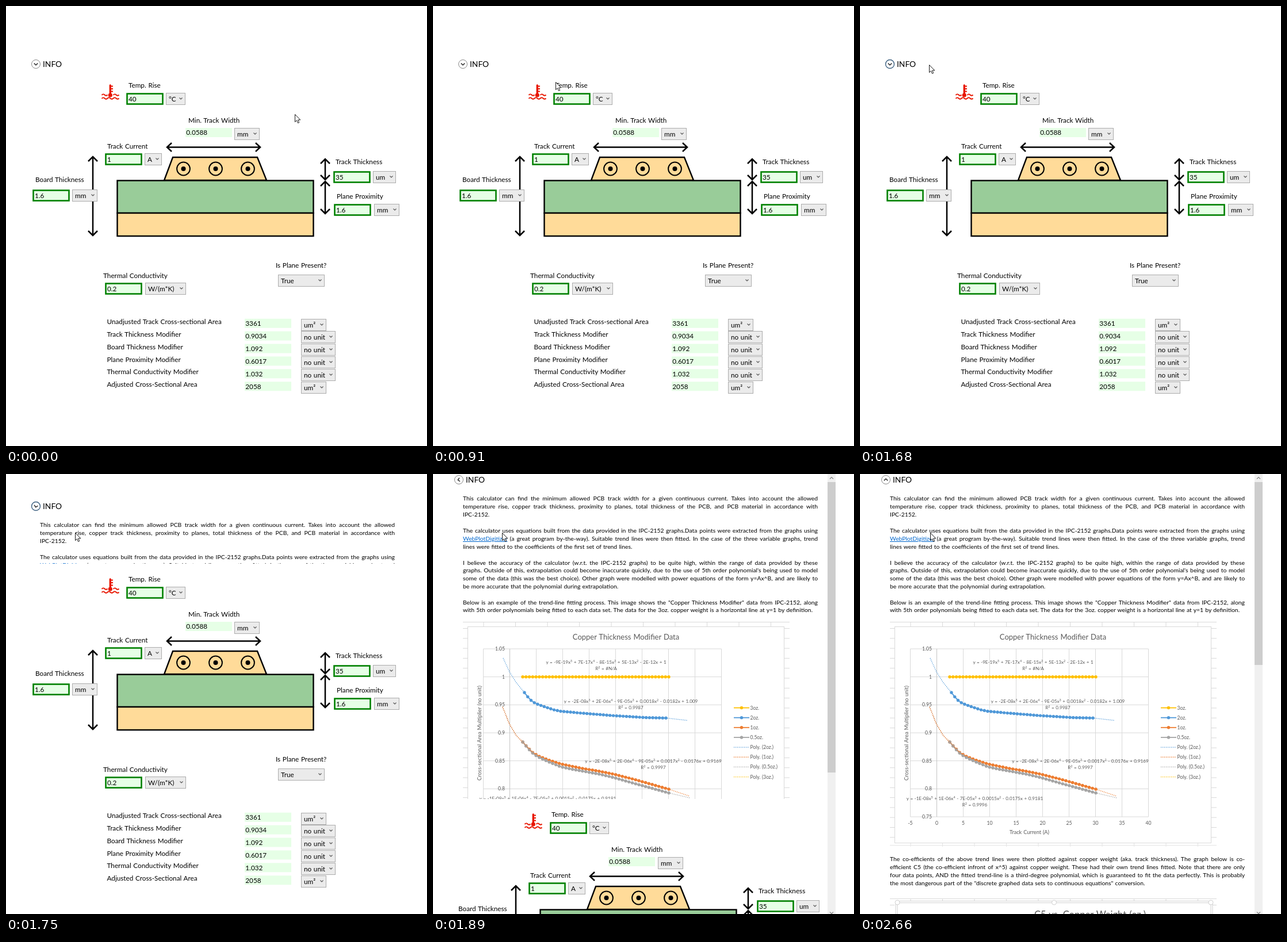
Write an HTML page that moves like this. It is 732x765 px and loops after 3640 ms.

```html
<!DOCTYPE html>
<html lang="en">
<head>
<meta charset="utf-8">
<title>Track width calculator</title>
<style>
  html, body { margin: 0; width: 100%; height: 100%; overflow: hidden; background: #fff; }
  body { position: relative; font: 11.75px Lato, sans-serif; color: #000; }
  div, svg { position: absolute; left: 0; top: 0; }
  svg { overflow: visible; }
  text { word-spacing: .055em; white-space: pre; }
  #info { top: 111px; width: 690px; overflow: hidden; }
  #doc { left: 7px; top: -20px; }
  .line { left: 52px; width: 617px; font-size: 10.35px; line-height: 14px; white-space: nowrap; }
  .full { text-align: justify; text-align-last: justify; }
  .last { word-spacing: .055em; }
  u { color: #06c; }
  #bar { left: 686px; width: 14px; height: 765px; background: #f0f0f0; }
  #thumb { top: 14px; width: 14px; background: #cdcdcd; }
</style>
</head>
<body>
<div id="page">
  <svg id="head" width="1" height="1">
    <circle id="ring" cx="52" cy="101" r="7.5" fill="#fff"/>
    <path id="chev" d="M48.8 99.6L52 102.7L55.2 99.6" fill="none" stroke="#333" stroke-width="1.6"/>
    <text x="64" y="106.3" font-size="13.8">INFO</text>
  </svg>
  <div id="info"><div id="doc"></div></div>
  <svg id="form" width="1" height="1"></svg>
</div>
<div id="bar">
  <div id="thumb"></div>
  <svg width="14" height="765" fill="none" stroke="#888" stroke-width="1.2">
    <path d="M4 8.5L7 5.5L10 8.5M4 761.5L7 764.5L10 761.5"/>
  </svg>
</div>
<svg id="mouse" width="1" height="1">
  <path d="M.5 .5V13.6L3.5 10.8L5.5 15.5L7.7 14.6L5.7 10H9.8Z" fill="#fff" stroke="#000" stroke-width=".9"/>
</svg>
<script>
const $ = id => document.getElementById(id);
const text = (x, y, s, extra = '') => `<text x="${x}" y="${y}" ${extra}>${s}</text>`;
const rect = (x, y, w, h, extra) => `<rect x="${x}" y="${y}" width="${w}" height="${h}" ${extra}/>`;
const path = (d, stroke, width, extra = '') =>
  `<path d="${d}" fill="none" stroke="${stroke}" stroke-width="${width}" ${extra}/>`;
const range = (n, f) => Array.from({ length: n }, (_, i) => f(i)).join('');

// ---- calculator form ----
const input = (x, y, s) =>
  rect(x + 1.5, y + 1.5, 62, 18, 'fill="#e6ffe6" stroke="#008000" stroke-width="2.6"') + text(x + 4, y + 14.5, s);
const result = (x, y, s) => rect(x, y, 81, 16, 'fill="#e6ffe6"') + text(x + 1.3, y + 12.3, s);
const combo = (x, y, w, s) => rect(x + .5, y + .5, w - 1, 20, 'fill="#ebebeb" stroke="#acacac"') +
  text(x + 5, y + 14.8, s) +
  path(`M${x + w - 10.5} ${y + 8.5}l2.5 2.5l2.5 -2.5`, '#555', 1.1);
const arrowV = (x, a, b) =>
  path(`M${x} ${a}V${b}M${x - 8} ${a + 8}L${x} ${a}l8 8M${x - 8} ${b - 8}L${x} ${b}l8 -8`, '#000', 2.5);

const labels = [
  [213, 142, 'Temp. Rise'], [317, 203, 'Min. Track Width'], [176, 247.5, 'Track Current'],
  [51, 306, 'Board Thickness'], [573, 274.5, 'Track Thickness'], [575, 335, 'Plane Proximity'],
  [469, 454.5, 'Is Plane Present?'], [169, 472.5, 'Thermal Conductivity']
];
const inputs = [[209, 151, 40], [172, 256, 1], [46, 319, 1.6], [569, 287, 35], [570, 344, 1.6], [172, 481, .2]];
const combos = [
  [278, 151, 34, '°C'], [397, 212, 44, 'mm'], [241, 256, 30, 'A'], [115, 319, 44, 'mm'],
  [638, 287, 40, 'um'], [640, 344, 44, 'mm'], [242, 481, 71, 'W/(m*K)'], [473, 467, 81, 'True']
];
const rows = [
  ['Unadjusted Track Cross-sectional Area', 3361], ['Track Thickness Modifier', .9034],
  ['Board Thickness Modifier', 1.092], ['Plane Proximity Modifier', .6017],
  ['Thermal Conductivity Modifier', 1.032], ['Adjusted Cross-Sectional Area', 2058]
];

const thermometer =
  path('M181.3 138V155M182 139.5h4M182 144h4M182 148.5h4', '#e81800', 2) +
  path('M181.3 138V154', '#e81800', 3.4, 'stroke-linecap="round"') +
  '<circle cx="181.3" cy="155" r="3.6" fill="#e81800"/>' +
  path('M166.5 155q2.5 -3 5 -.5t5 0M186.5 155q2.5 -3 5 -.5t5 0' +
       'M166.5 161q2.5 -3 5 -.5t5 0t5 0t5 0t5 0t5 0', '#e81800', 1.9);

const ink = 'stroke="#000" stroke-width="2.4"';
const board =
  `<path d="M290 263H437L453 303H275Z" fill="#ffdb99" ${ink}/>` +
  rect(193.5, 303.5, 341, 56.5, `fill="#9c9" ${ink}`) +
  rect(193.5, 360, 341, 40, `fill="#ffdb99" ${ink}`) +
  range(3, i => `<circle cx="${308.5 + 56 * i}" cy="283" r="11.4" fill="none" stroke="#000" stroke-width="2"/>` +
    `<circle cx="${308.5 + 56 * i}" cy="283" r="4"/>`) +
  path('M280 245.5H442M288 238L280 245.5l8 7.5M434 238L442 245.5l-8 7.5', '#000', 2.5) +
  arrowV(151, 262, 399) + arrowV(555, 266, 302) + arrowV(555, 305, 361);

const table = rows.map(([name, value], i) =>
  text(175.5, 552.8 + 21.9 * i, name) + result(415, 543.7 + 21.9 * i, value)).join('');
const units = rows.map(([, value], i) => {
  const area = value > 100;
  return combo(513, Math.round(543.5 + 21.9 * i), area ? 44 : 60, area ? 'um²' : 'no unit');
}).join('');

$('form').innerHTML = thermometer + board +
  labels.map(a => text(...a)).join('') + result(312, 212, '0.0588') + table +
  '<g id="controls">' + inputs.map(a => input(...a)).join('') +
  combos.map(a => combo(...a)).join('') + units + '</g>';

// ---- info text ----
const paragraphs = [
  [42.3,
    'This calculator can find the minimum allowed PCB track width for a given continuous current. Takes into account the allowed',
    'temperature rise, copper track thickness, proximity to planes, total thickness of the PCB, and PCB material in accordance with',
    'IPC-2152.'],
  [98.6,
    'The calculator uses equations built from the data provided in the IPC-2152 graphs.Data points were extracted from the graphs using',
    '<u>WebPlotDigitizer</u> (a great program by-the-way). Suitable trend lines were then fitted. In the case of the three variable graphs, trend',
    'lines were fitted to the coefficients of the first set of trend lines.'],
  [154,
    'I believe the accuracy of the calculator (w.r.t. the IPC-2152 graphs) to be quite high, within the range of data provided by these',
    "graphs. Outside of this, extrapolation could become inaccurate quickly, due to the use of 5th order polynomial's being used to model",
    'some of the data (this was the best choice). Other graph were modelled with power equations of the form y=Ax^B, and are likely to',
    'be more accurate that the polynomial during extrapolation.'],
  [223,
    'Below is an example of the trend-line fitting process. This image shows the "Copper Thickness Modifier" data from IPC-2152, along',
    'with 5th order polynomials being fitted to each data set. The data for the 3oz. copper weight is a horizontal line at y=1 by definition.'],
  [669.7,
    'The co-efficients of the above trend lines were then plotted against copper weight (aka. track thickness). The graph below is co-',
    'efficient C5 (the co-efficient infront of x^5) against copper weight. These had their own trend lines fitted. Note that there are only',
    'four data points, AND the fitted trend-line is a third-degree polynomial, which is guaranteed to fit the data perfectly. This is probably',
    'the most dangerous part of the "discrete graphed data sets to continuous equations" conversion.']
];
const prose = paragraphs.map(([y, ...lines]) => lines.map((s, i) =>
  `<div class="line ${i < lines.length - 1 ? 'full' : 'last'}" style="top:${Math.round(y - 7.4 + 13.85 * i)}px">${s}</div>`
).join('')).join('');

// ---- chart ----
const yellow = '#ffc000', blue = '#4f98d8', orange = '#ed7d31', gray = '#a5a5a5', grid = '#d9d9d9';
const mid = 'text-anchor="middle"';
const at = (pts, x) => {
  const i = Math.max(1, pts.findIndex(p => p[0] >= x));
  const [a, b] = [pts[i - 1], pts[i]];
  return a[1] + (b[1] - a[1]) * (x - a[0]) / (b[0] - a[0]);
};
const trend = (pts, color) => path('M' + pts.join('L'), color, 1.3, 'stroke-dasharray="1.3 1.7"');
const series = (pts, color, from, to, n) => {
  const dots = Array.from({ length: n }, (_, i) => {
    const x = from + (to - from) * i / (n - 1);
    return [x, at(pts, x)];
  });
  return trend(pts, color) + path('M' + dots.join('L'), color, 1.8) +
    dots.map(([x, y]) => `<circle cx="${x}" cy="${y}" r="2.7" fill="${color}"/>`).join('');
};
const equation = (x, y, s, r) => [s, 'R^2 = ' + r].map((line, i) =>
  text(x, y + 11 * i, line.replace(/\^(\d)/g, '<tspan baseline-shift="super" font-size="5.5">$1</tspan>'),
    mid + ' font-size="8.15"')).join('');

const bluePts = [[122, 320], [133, 344], [145, 363], [159, 380], [166, 389], [173, 396], [181, 400], [195, 405],
  [210, 410], [222, 412.5], [255, 415.5], [312, 420], [370, 423.5], [406, 424.3], [443, 428.5]];
const orangePts = [[121, 405], [133, 435], [145, 455], [156, 466], [165, 476], [174, 485], [185, 491], [200, 497],
  [222, 504], [260, 512], [285, 516], [315, 522], [350, 531], [410, 548], [446, 560]];
const grayPts = [[121, 405], [133, 435], [145, 455], [156, 466], [165, 477], [175, 487], [185, 493], [200, 500],
  [222, 509], [240, 513], [290, 522], [315, 528], [350, 538], [410, 554.5], [446, 563]];

const sheet = (top, bottom) => path(`M52 ${top}H620` +
  range(10, i => `M${88 + 55.5 * i} ${top}v8`), grid, 1) +
  path(range(Math.floor((bottom - top) / 17.3), i => `M52 ${top + 11 + 17.3 * i}h8M611 ${top + 11 + 17.3 * i}h9`), grid, 1);

const legend = [yellow, blue, orange, gray, blue, orange, gray, yellow].map((c, i) => {
  const y = 406.5 + 17.15 * i;
  const name = ['3oz.', '2oz.', '1oz.', '0.5oz.', 'Poly. (2oz.)', 'Poly. (1oz.)', 'Poly. (0.5oz.)', 'Poly. (3oz.)'][i];
  return (i < 4 ? path(`M523 ${y}h27`, c, 1.8) + `<circle cx="536.5" cy="${y}" r="2.7" fill="${c}"/>`
    : trend([[523, y], [550, y]], c)) + text(551.5, y + 3, name, 'font-size="8.5"');
}).join('');

const chart = sheet(257.5, 645) +
  path('M52 645.5H620' + range(10, i => `M${88 + 55.5 * i} 641v7`), '#e4e4e4', 1) +
  rect(60.5, 265.5, 550, 376, `fill="#fff" stroke="${grid}"`) +
  text(335.5, 288, 'Copper Thickness Modifier Data', mid + ' font-size="13"') +
  path(range(7, i => `M87.5 ${304 + 48.67 * i}H501.5`) + range(10, i => `M${87.5 + 46 * i} 304V596`), grid, 1) +
  path('M133.5 304V596', '#c4c4c4', 1) +
  range(7, i => text(125, 307 + 48.67 * i, +(1.05 - .05 * i).toFixed(2), 'text-anchor="end" font-size="8.6"')) +
  range(10, i => text(87.5 + 46 * i, 610, 5 * i - 5, mid + ' font-size="8.6"')) +
  text(294.5, 626, 'Track Current (A)', mid + ' font-size="9.2"') +
  text(0, 0, 'Cross-sectional Area Multiplier (no unit)', mid + ' font-size="9.4" transform="translate(83.5 450.5) rotate(-90)"') +
  series([[156, 352.7], [410, 352.7]], yellow, 156, 410, 45) +
  series(bluePts, blue, 159, 405, 44) +
  series(orangePts, orange, 156, 410, 45) +
  series(grayPts, gray, 156, 410, 45) +
  trend(orangePts.slice(0, 7), orange) +
  equation(301, 330, 'y = -9E-19x^5 + 7E-17x^4 - 8E-15x^3 + 5E-13x^2 - 2E-12x + 1', '#N/A') +
  equation(344, 398, 'y = -2E-08x^5 + 2E-06x^4 - 9E-05x^3 + 0.0018x^2 - 0.0182x + 1.009', '0.9987') +
  equation(383, 501.5, 'y = -2E-08x^5 + 2E-06x^4 - 9E-05x^3 + 0.0017x^2 - 0.0176x + 0.9169', '0.9997') +
  equation(199.5, 566.5, 'y = -1E-08x^5 + 1E-06x^4 - 7E-05x^3 + 0.0015x^2 - 0.0175x + 0.9181', '0.9996') +
  legend;

const nextChart = sheet(738.5, 790) +
  rect(62, 742.5, 551, 90, 'rx="4" fill="#fff" stroke="#d0d0d0"') +
  rect(65, 745.5, 545, 90, 'fill="#fff" stroke="#d0d0d0"') +
  [65, 337.5, 610].map(x => `<circle cx="${x}" cy="745" r="4" fill="#fff" stroke="#d0d0d0"/>`).join('') +
  text(400, 771.5, 'C5 vs. Copper Weight (oz.)', mid + ' font-size="16.5"');

$('doc').innerHTML = `<svg width="1" height="1" fill="#595959">${chart + nextChart}</svg>` + prose;

// ---- motion: the screen refreshes every 70 ms ----
const STEP = 70, LOOP = 3640;
const mousePath = [[502, 188], [490, 186], [450, 178], [390, 166], [322, 153], [262, 141], [213, 132],
  [176, 123], [150, 117], [135, 110], [125, 105], [120, 102]];
const heights = [0, 90, 292, 545, 810, 1040, 1211];
const pick = (list, i) => list[Math.max(0, Math.min(list.length - 1, i))];

function draw(ms) {
  const n = Math.floor(ms % LOOP / STEP);
  const h = pick(heights, n - 24);
  const scrolls = h > 200;
  const hover = n >= 16 && !scrolls;
  const [mx, my] = n >= 38 ? [122, 102] : pick(mousePath, n - 7);

  // The scrollbar moves the page by 6.5 px; controls round to the right, the rest to the left.
  $('page').style.transform = `translate(${scrolls ? -7 : 0}px, ${-Math.min(h / 2, 91)}px)`;
  $('controls').setAttribute('transform', `translate(${scrolls ? 1 : 0} 0)`);
  $('info').style.height = h + 'px';
  $('form').style.top = h + 'px';
  $('chev').setAttribute('transform', `rotate(${180 * h / 1211} 52 101)`);
  $('ring').setAttribute('stroke', hover ? '#3c6080' : '#8a8a8a');
  $('ring').setAttribute('stroke-width', hover ? 1.4 : 1);
  $('bar').style.display = scrolls ? 'block' : 'none';
  $('thumb').style.height = 748 * 765 / (589 + h) + 'px';
  $('mouse').style.transform = `translate(${mx}px, ${my}px)`;
}

const start = performance.now();
function tick() {
  draw(performance.now() - start);
  requestAnimationFrame(tick);
}
draw(0);
requestAnimationFrame(tick);
</script>
</body>
</html>
```
